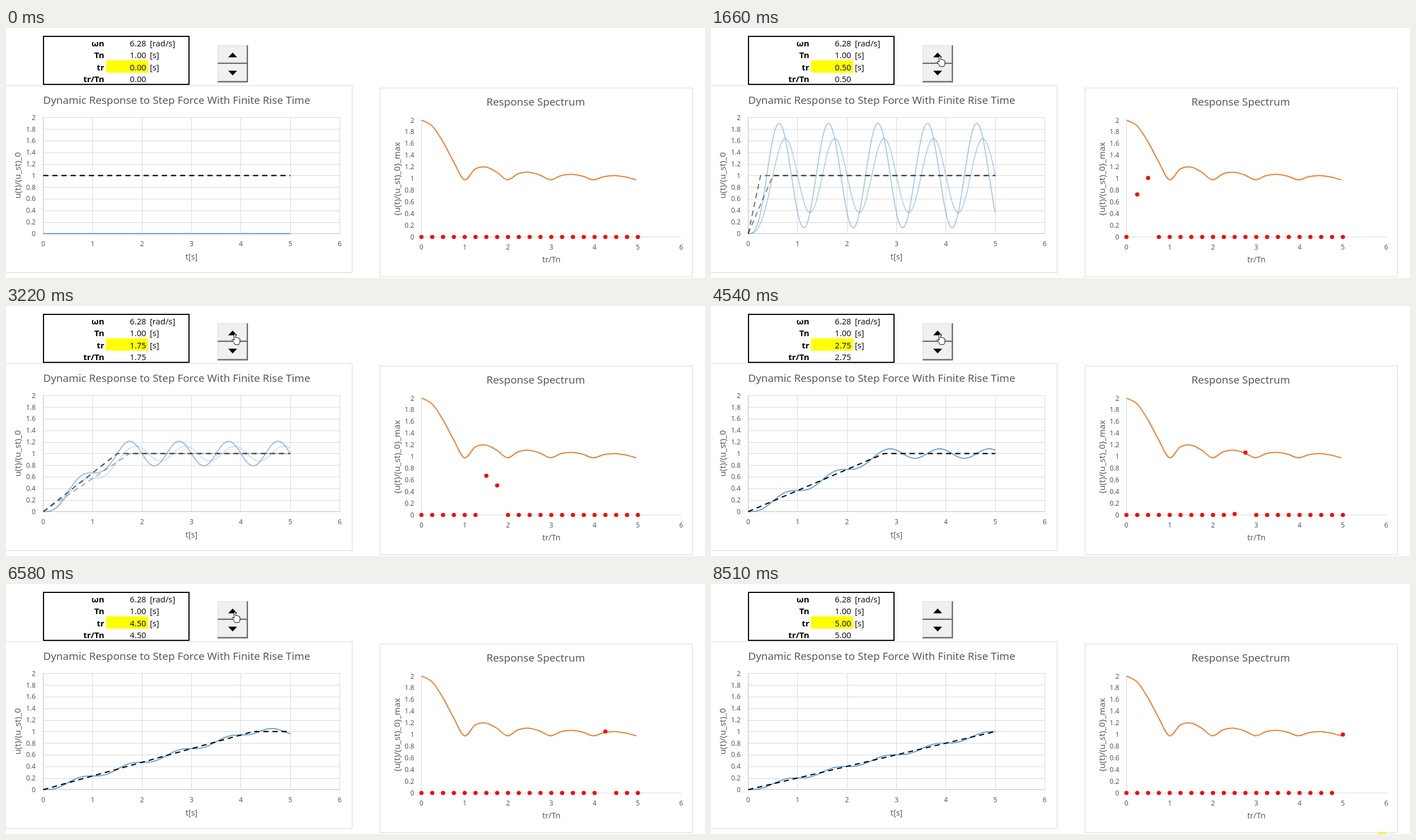
Write an HTML page that moves like this. It is 1249 by 448 pixels and loops after 8.59 s.

```html
<!DOCTYPE html>
<html lang="en">
<head>
<meta charset="utf-8">
<title>Response to a step force with finite rise time</title>
<style>
  html, body { margin: 0; width: 100%; height: 100%; overflow: hidden; background: #fff; }
  svg { display: block; }
  text { font-family: "Noto Sans", "Open Sans", sans-serif; fill: #595959; }
  .cell { font-size: 14.7px; font-weight: 300; fill: #111; }
  .head { font-size: 15px; font-weight: 700; fill: #000; }
  .title { font-size: 18.85px; }
  .axis { font-size: 14.3px; }
  .side { font-size: 15.2px; }
  .tick { font-size: 12.2px; }
  .grid { stroke: #d9d9d9; fill: none; }
  .base { stroke: #bfbfbf; fill: none; }
  .blue { stroke: #5b9bd5; stroke-width: 1.8; fill: none; }
  .force { stroke: #000; stroke-width: 2.1; stroke-dasharray: 9.3 7; fill: none; }
</style>
</head>
<body>
<svg id="stage" width="1249" height="448" viewBox="0 0 1249 448"></svg>
<script>
const LOOP = 8590, SCROLL = 120, MORPH = 160;
// The response plot fades a little ahead of the spectrum markers.
const LEAD = 8, FADE = 150;
// Moment at which the markers start to take each new rise time (0.25 per click).
const starts = [1304, 1600, 1900, 2220, 2530, 2830, 3180, 3510, 3747, 4090,
                4400, 4749, 4958, 5330, 5620, 5940, 6290, 6590, 6900, 7230];
const ENTER = 50, ARRIVE = 900, LEAVE = 7528, GONE = 8260, RETURN = 8510;
const TAU = 2 * Math.PI;

const stage = document.getElementById('stage');
const clamp = v => Math.max(0, Math.min(1, v));
const easeOut = u => 1 - (1 - u) ** 2;
const smooth = u => u * u * (3 - 2 * u);
const mix = (a, b, u) => a + (b - a) * u;

function add(tag, attrs, parent = stage) {
  const el = document.createElementNS('http://www.w3.org/2000/svg', tag);
  for (const k in attrs) el.setAttribute(k, attrs[k]);
  return parent.appendChild(el);
}
function label(str, x, y, cls, anchor = 'middle', parent = stage) {
  const el = add('text', { x, y, class: cls, 'text-anchor': anchor }, parent);
  el.textContent = str;
  return el;
}
function sideLabel(str, x, y) {
  label(str, 0, 0, 'side').setAttribute('transform', `translate(${x} ${y}) rotate(-90)`);
}
const line = (d, cls, parent) => add('path', { d, class: cls }, parent);

// Parameter table
const rowY = [33, 54.3, 76.3, 97.3];
add('rect', { x: 179, y: 58, width: 75, height: 22, fill: '#ff0' });
['ωn', 'Tn', 'tr', 'tr/Tn'].forEach((s, i) => label(s, 175.5, rowY[i], 'head', 'end'));
['[rad/s]', '[s]', '[s]'].forEach((s, i) => label(s, 257, rowY[i], 'cell', 'start'));
label('6.28', 250.5, rowY[0], 'cell', 'end');
label('1.00', 250.5, rowY[1], 'cell', 'end');
const counters = [[58, 21.5, rowY[2]], [79.5, 23, rowY[3]]].map(([y, height, base]) => {
  const box = add('svg', { x: 178, y, width: 75, height, overflow: 'hidden' });
  const make = () => label('', 72.5, 0, 'cell', 'end', box);
  return { base: base - y, now: make(), old: make() };
});
add('rect', { x: 67, y: 15, width: 260, height: 86, fill: 'none', stroke: '#000', 'stroke-width': 2 });

// Spin button
const keys = [[31, 'M397 52.5H413L405 44Z'], [64, 'M397 76.5H413L405 85Z']].map(([y, arrow]) => {
  add('rect', { x: 378, y, width: 54, height: 33, fill: '#f0f0f0' });
  const light = add('path', { d: `M379 ${y + 32}V${y + .5}H431`, fill: 'none', stroke: '#dcdcdc' });
  add('path', { d: `M378 ${y + 32.5}H431.5V${y}`, fill: 'none', stroke: '#333', 'stroke-width': 1.4 });
  add('path', { d: `M380 ${y + 31}H430V${y + 1}`, fill: 'none', stroke: '#a0a0a0' });
  return { light, arrow: add('path', { d: arrow, fill: '#000' }) };
});

// Response chart
const tx = t => 66.5 + 88.3 * t, uy = u => 368.5 - 104.1 * u;
line('M-1 103.5H618.5V438.5H-1', 'grid');
for (let i = 0; i <= 10; i++) {
  const y = uy(i / 5);
  if (i) line(`M66.5 ${Math.round(y) + .5}H597`, 'grid');
  label(i / 5, 53, y + 4.4, 'tick', 'end');
}
for (let i = 0; i <= 6; i++) {
  const x = Math.floor(tx(i)) + .5;
  if (i) line(`M${x} 160V368.5`, 'grid');
  label(i, tx(i), 391.3, 'tick');
}
line('M66.5 160V368.5H597', 'base');
label('Dynamic Response to Step Force With Finite Rise Time', 305, 135.5, 'title');
label('t[s]', 331.5, 414.5, 'axis');
sideLabel('u(t)/(u_st)_0', 26, 264);

function response(t, tr) {
  if (!tr) return 0;
  const k = TAU * tr;
  return t < tr ? t / tr - Math.sin(TAU * t) / k
                : 1 - (Math.sin(TAU * t) - Math.sin(TAU * (t - tr))) / k;
}
function responsePath(tr) {
  const pts = [];
  for (let i = 0; i <= 250; i++)
    pts.push(tx(i / 50).toFixed(2) + ' ' + uy(response(i / 50, tr)).toFixed(2));
  return 'M' + pts.join('L');
}
const plots = starts.concat(0).map((_, n) => {
  const tr = n / 4, g = add('g', {});
  line(responsePath(tr), 'blue', g);
  line(`M${tx(0)} ${uy(tr ? 0 : 1)}L${tx(tr)} ${uy(1)}H${tx(5)}`, 'force', g);
  return g;
});

// Spectrum chart
const sx = r => 742.3 + 77.35 * r, sy = v => 374.4 - 104.7 * v;
const peak = r => r ? 1 + Math.abs(Math.sin(Math.PI * r)) / (Math.PI * r) : 2;
add('rect', { x: 668.5, y: 107.5, width: 558, height: 338, class: 'grid' });
line('M742.5 165V374.5H1206.5', 'grid');
for (let i = 0; i <= 10; i++) label(i / 5, 729.5, sy(i / 5) + 4.5, 'tick', 'end');
for (let i = 0; i <= 6; i++) label(i, sx(i), 397.3, 'tick');
label('Response Spectrum', 946.5, 139.3, 'title');
label('tr/Tn', 974.5, 420, 'axis');
sideLabel('{u(t)/(u_st)_0}_max', 704, 270.5);

function smoothPath(p) {
  const at = i => p[Math.max(0, Math.min(p.length - 1, i))];
  let d = 'M' + p[0];
  for (let i = 0; i < p.length - 1; i++) {
    const [a, b, c, e] = [at(i - 1), at(i), at(i + 1), at(i + 2)];
    d += `C${b.map((v, k) => v + (c[k] - a[k]) / 6)} ${c.map((v, k) => v - (e[k] - b[k]) / 6)} ${c}`;
  }
  return d;
}
const spectrum = Array.from({ length: 21 }, (_, i) =>
  [742.4 + 76.75 * i / 4, 272 - 107 * (peak(i / 4) - 1)]);
add('path', { d: smoothPath(spectrum), fill: 'none', stroke: '#ed7d31', 'stroke-width': 2 });
const dots = spectrum.map((_, n) => add('circle', { cx: sx(n / 4), r: 3.7, fill: '#f00' }));

// Pointer
const pointer = add('g', {});
const halo = add('circle', { r: 14, fill: '#ffee33', opacity: .85 }, pointer);
const ink = { fill: '#fff', stroke: '#000', 'stroke-linejoin': 'round' };
const arrow = add('path', { ...ink, d: 'M0 0V16L4 12.5L6.5 18L9 17L6.5 11.5H12Z' }, pointer);
const hand = add('path', { ...ink, d: 'M-1.5 1Q0 -1 1.5 1V7Q3 5.5 4.5 7Q6 6.2 7 8Q9 7.5 9 10V14Q9 17 7 19H0Q-1 16 -5 11.5Q-5 9.5 -3 10L-1.5 11.5Z' }, pointer);
const show = (el, on) => el.setAttribute('visibility', on ? 'visible' : 'hidden');

function drawPointer(t) {
  let x = 409, y = 50;
  if (t < ARRIVE) {
    const u = smooth(clamp((t - ENTER) / (ARRIVE - ENTER)));
    x = mix(1153, x, u);
    y = mix(463, y, u);
  } else if (t >= RETURN) {
    x = 1199;
    y = 458;
  } else if (t > LEAVE) {
    const u = easeOut(clamp((t - LEAVE) / (GONE - LEAVE)));
    x = mix(x, 1166, u);
    y = mix(y, 463, u);
  }
  const over = x < 431;
  pointer.setAttribute('transform', `translate(${x} ${y})`);
  show(halo, t < ARRIVE || t > LEAVE);
  show(hand, over);
  show(arrow, !over);
}

function drawCounters(t) {
  const n = starts.filter(s => t >= s - SCROLL).length;
  const e = n ? easeOut(clamp((t - starts[n - 1] + SCROLL) / SCROLL)) : 1;
  for (const c of counters) {
    c.now.textContent = (n / 4).toFixed(2);
    c.old.textContent = n && e < 1 ? ((n - 1) / 4).toFixed(2) : '';
    c.now.setAttribute('y', c.base - 21 * (1 - e));
    c.old.setAttribute('y', c.base + 21 * e);
  }
}

function drawButton(t) {
  const down = starts.some(s => t > s - SCROLL - 70 && t < s - SCROLL - 5);
  keys[0].light.setAttribute('stroke', down ? '#696969' : '#dcdcdc');
  keys[0].arrow.setAttribute('transform', down ? 'translate(1 1)' : '');
}

function drawCharts(t) {
  const fade = [1, ...starts.map(s => clamp((t - s + LEAD) / FADE)), 0];
  const rise = [1, ...starts.map(s => easeOut(clamp((t - s) / MORPH))), 0];
  plots.forEach((g, n) => {
    const o = Math.max(0, fade[n] - fade[n + 1]);
    g.setAttribute('opacity', o);
    show(g, o > 0);
  });
  dots.forEach((dot, n) =>
    dot.setAttribute('cy', sy(n ? peak(n / 4) * (rise[n] - rise[n + 1]) : 0)));
}

const origin = performance.now();
function frame() {
  const t = (performance.now() - origin) % LOOP;
  drawCounters(t);
  drawButton(t);
  drawCharts(t);
  drawPointer(t);
  requestAnimationFrame(frame);
}
frame();
</script>
</body>
</html>
```
